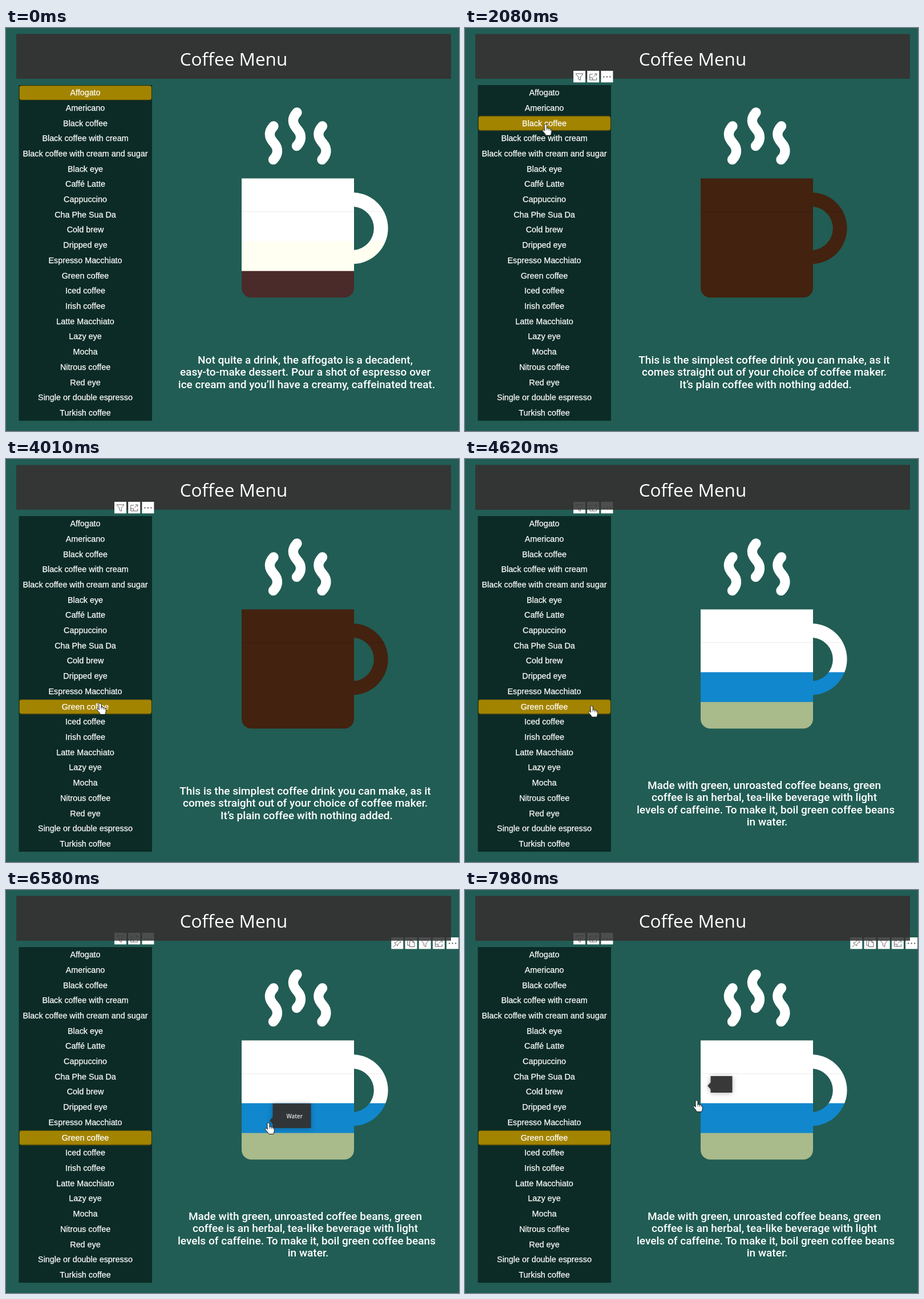
An HTML page that plays this animation: 794x706 px, repeating every 8000 ms.

```html
<!DOCTYPE html>
<html lang="en">
<head>
<meta charset="utf-8">
<title>Coffee Menu</title>
<style>
  html, body { margin: 0; width: 100%; height: 100%; overflow: hidden; background: #215d54; }
  svg { display: block; width: 794px; height: 706px; }
  text { fill: #fff; font-variant-ligatures: none; }
  .title { font: 400 31.5px "Open Sans", "Noto Sans", sans-serif; text-anchor: middle; }
  .menu text { font: 14.35px "Liberation Sans", Arial, sans-serif; text-anchor: middle; stroke: #fff; stroke-width: .25px; }
  .note text { font: 500 19.05px Roboto, sans-serif; text-anchor: middle; }
  .tip text { font: 600 9.8px "Open Sans", "Noto Sans", sans-serif; fill: #e4e4e4; }
  .tip { filter: drop-shadow(0 1px 4px rgba(0, 0, 0, .3)); }
  .icon { fill: none; stroke: #666; stroke-width: 1; }

  /* Everything switches hard unless a keyframe asks for easing. */
  .anim { animation: 8s step-end infinite; }
  #pick { animation-name: pick; }
  #affogato { animation-name: affogato; }
  #black { animation-name: black; }
  #green { animation-name: green; }
  #menuTools { animation-name: menu-tools; }
  #mugTools { animation-name: mug-tools; }
  #cover { animation-name: cover; }
  #tipCoffee { animation-name: tip-coffee; }
  #tipBeans { animation-name: tip-beans; }
  #tipWater { animation-name: tip-water; }
  #tipBlank { animation-name: tip-blank; }
  #hand { animation-name: hand; }

  @keyframes pick {
    0% { transform: translateY(0); }
    14.875% { transform: translateY(53.42px); }
    50.125%, 100% { transform: translateY(320.5px); }
  }
  @keyframes affogato { 0% { visibility: visible; } 17.25%, 100% { visibility: hidden; } }
  @keyframes black {
    0% { visibility: hidden; } 17.25% { visibility: visible; } 50.75%, 100% { visibility: hidden; }
  }
  @keyframes green { 0% { visibility: hidden; } 50.75%, 100% { visibility: visible; } }
  @keyframes menu-tools { 0% { visibility: hidden; } 4.25%, 100% { visibility: visible; } }
  @keyframes mug-tools {
    0% { visibility: hidden; } 28.5% { visibility: visible; }
    44% { visibility: hidden; } 58.5%, 100% { visibility: visible; }
  }
  @keyframes cover {
    0% { visibility: visible; } 17.25% { visibility: hidden; } 28% { visibility: visible; }
    49.5% { visibility: hidden; } 57.5%, 100% { visibility: visible; }
  }
  @keyframes tip-coffee {
    0% { visibility: hidden; transform: translate(425px, 388px); }
    34.25% { visibility: visible; transform: translate(425px, 388px); }
    40.625%, 100% { visibility: hidden; transform: translate(425px, 388px); }
  }
  @keyframes tip-beans {
    0% { visibility: hidden; transform: translate(422px, 445px); }
    67.125% { visibility: visible; transform: translate(422px, 445px); }
    73.5% { visibility: visible; transform: translate(422px, 445px); animation-timing-function: ease-in-out; }
    77%, 100% { visibility: hidden; transform: translate(461px, 406px); }
  }
  @keyframes tip-water {
    0% { visibility: hidden; transform: translate(462px, 404px); }
    77% { visibility: visible; transform: translate(462px, 404px); }
    82.875% { visibility: visible; transform: translate(462px, 404px); animation-timing-function: ease-in; }
    84%, 100% { visibility: hidden; transform: translate(463px, 374px); }
  }
  @keyframes tip-blank {
    0% { visibility: hidden; transform: translate(461px, 348px); }
    84% { visibility: visible; transform: translate(461px, 348px); }
    91.5% { visibility: visible; transform: translate(461px, 348px); animation-timing-function: ease-in-out; }
    95.125% { visibility: visible; transform: translate(454px, 296px); }
    98.4% { visibility: visible; transform: translate(454px, 296px); animation-timing-function: linear; }
    99.75%, 100% { visibility: visible; transform: translate(425px, 343px); }
  }
  @keyframes hand {
    0% { visibility: hidden; transform: translate(146px, 660px); }
    4.25% { visibility: visible; transform: translate(146px, 660px); animation-timing-function: ease-in; }
    8.25% { visibility: visible; transform: translate(114px, 390px); animation-timing-function: ease-out; }
    13.125% { visibility: visible; transform: translate(135px, 163px); }
    25.5% { visibility: visible; transform: translate(135px, 163px); animation-timing-function: ease-in-out; }
    30.75% { visibility: visible; transform: translate(474px, 410px); }
    40.125% { visibility: visible; transform: translate(474px, 410px); animation-timing-function: ease-in-out; }
    48.75% { visibility: visible; transform: translate(165px, 427px); }
    54.875% { visibility: visible; transform: translate(165px, 427px); animation-timing-function: ease-in-out; }
    64.25% { visibility: visible; transform: translate(454px, 450px); }
    73% { visibility: visible; transform: translate(454px, 450px); animation-timing-function: ease-in-out; }
    77% { visibility: visible; transform: translate(460px, 407px); }
    82.75% { visibility: visible; transform: translate(460px, 407px); animation-timing-function: ease-in-out; }
    84.625% { visibility: visible; transform: translate(461px, 355px); }
    91.125% { visibility: visible; transform: translate(461px, 355px); animation-timing-function: ease-in-out; }
    95.125% { visibility: visible; transform: translate(451px, 304px); }
    98.125% { visibility: visible; transform: translate(451px, 304px); animation-timing-function: ease-in-out; }
    99.75%, 100% { visibility: visible; transform: translate(406px, 368px); }
  }
</style>
</head>
<body>
<svg viewBox="0 0 794 706">
  <defs>
    <clipPath id="mug">
      <path d="M413 263.500H610V455a17 17 0 0 1-17 17.300H430a17 17 0 0 1-17-17.300Z"/>
      <path d="M609.5 288.200A62.6 62.6 0 0 1 609.5 413.300V389A38.1 38.1 0 0 0 609.5 313Z"/>
    </clipPath>
    <path id="steam" d="M469 172C458 184 462 193 470 202C478 211 477 222 468.500 230.500"/>
    <g id="funnel"><path d="M4 5H17L12.200 11V16.500L8.800 14.500V11Z"/></g>
    <g id="focus"><path d="M10 6H4.500V16H16.500V12M12.500 5H16.500V9M16.500 5L11 10.500M4.500 12H9.500V16"/></g>
    <g id="dots" fill="#666" stroke="none">
      <circle cx="5" cy="10.500" r="1.200"/><circle cx="10.500" cy="10.500" r="1.200"/><circle cx="16" cy="10.500" r="1.200"/>
    </g>
    <g id="pin"><path d="M12 3.500L17 8.500L14.500 9L11.500 12L11 15L5.500 9.500L8.500 9L11.500 6ZM8 12.500L3.500 17"/></g>
    <g id="copy"><path d="M8 16.500H16.500V9L13.500 6H8ZM13.500 6V9H16.500M8 14H4.500V4H10.500L12 6"/></g>
  </defs>

  <rect width="794" height="706" fill="#215d54"/>
  <rect x="18" y="10.500" width="762" height="78.300" fill="#333635"/>

  <g class="menu">
    <rect x="22.500" y="100" width="233.500" height="588" fill="#0c2b26"/>
    <rect id="pick" class="anim" x="23.300" y="100.800" width="232" height="25.400" rx="3.500" fill="#a38400" stroke="#2a2a14" stroke-width=".7"/>
    <g id="items"></g>
  </g>

  <g fill="none" stroke="#fff" stroke-width="17.400" stroke-linecap="round">
    <use href="#steam"/><use href="#steam" x="41" y="-24"/><use href="#steam" x="85.500"/>
  </g>
  <g id="scenes"></g>

  <g id="menuTools" class="anim"></g>
  <g id="mugTools" class="anim"></g>
  <rect id="cover" class="anim" x="18" y="10.500" width="762" height="78.300" fill="#333635" opacity=".88"/>
  <text class="title" x="399" y="66">Coffee Menu</text>

  <g id="tips"></g>

  <g id="hand" class="anim" stroke="#111" stroke-linejoin="round" stroke-linecap="round">
    <path fill="#fff" d="M-2 1.800Q0-1 2 1.800V8Q4 6.800 5.300 8.500Q7.300 7.800 8.200 9.700Q10.200 9.500 10.300 11.500V15Q10 18 8.700 20.500H.5Q-1.500 17-4.800 13.400Q-6.500 10.800-4.500 10.200Q-3.200 10.200-2 12Z"/>
    <path fill="none" stroke-width=".7" d="M2 8V11M5.300 8.700V11.500M8.200 10V12"/>
  </g>
</svg>
<script>
  const $ = id => document.getElementById(id);
  const text = (x, y, s) => `<text x="${x}" y="${y}">${s}</text>`;
  const band = (y, h, fill) => `<rect x="410" y="${y}" width="265" height="${h}" fill="${fill}"/>`;

  const drinks = ["Affogato", "Americano", "Black coffee", "Black coffee with cream",
    "Black coffee with cream and sugar", "Black eye", "Caffé Latte", "Cappuccino", "Cha Phe Sua Da",
    "Cold brew", "Dripped eye", "Espresso Macchiato", "Green coffee", "Iced coffee", "Irish coffee",
    "Latte Macchiato", "Lazy eye", "Mocha", "Nitrous coffee", "Red eye",
    "Single or double espresso", "Turkish coffee"];
  $("items").innerHTML = drinks.map((name, i) => text(139, Math.round(118.1 + i * 26.71), name)).join("");

  // Colours run from the top of the mug to the bottom.
  function scene(id, [top, line, middle, bottom], firstLine, lines) {
    const note = lines.map((s, i) =>
      text(524.5 + 2.5 * Math.max(0, i - 1), firstLine + i * 21.4, s)).join("");
    return `<g id="${id}" class="anim"><g clip-path="url(#mug)">` +
      band(260, 114, top) + band(321.3, 0.9, line) + band(373.5, 53, middle) + band(425.7, 50, bottom) +
      `</g><g class="note">${note}</g></g>`;
  }
  $("scenes").innerHTML =
    scene("affogato", ["#fff", "#e8eaea", "#fffff2", "#4b2a2a"], 588, [
      "Not quite a drink, the affogato is a decadent,",
      "easy-to-make dessert. Pour a shot of espresso over",
      "ice cream and you’ll have a creamy, caffeinated treat."]) +
    scene("black", ["#432210", "#391c0d", "#432210", "#432210"], 588, [
      "This is the simplest coffee drink you can make, as it",
      "comes straight out of your choice of coffee maker.",
      "It’s plain coffee with nothing added."]) +
    scene("green", ["#fff", "#e8eaea", "#1187cd", "#a9ba8b"], 578, [
      "Made with green, unroasted coffee beans, green",
      "coffee is an herbal, tea-like beverage with light",
      "levels of caffeine. To make it, boil green coffee beans",
      "in water."]);

  const tools = (x, y, names) => names.map((name, i) =>
    `<g class="icon" transform="translate(${x + i * 24.2} ${y})">` +
    `<rect width="21" height="20.3" fill="#fff" stroke="none"/><use href="#${name}"/></g>`).join("");
  $("menuTools").innerHTML = tools(190, 75, ["funnel", "focus", "dots"]);
  $("mugTools").innerHTML = tools(675.3, 83, ["pin", "copy", "funnel", "focus", "dots"]);

  // Each tooltip is placed by the point of its arrow.
  const tip = (id, width, label) => {
    const [y, h] = label ? [-30, 43] : [-17, 29];
    return `<g id="${id}" class="anim tip"><path fill="#333" opacity=".96" ` +
      `d="M0 0L5.5-6V${y}h${width}v${h}h${-width}V6Z"/>${text(29.5, -4, label)}</g>`;
  };
  $("tips").innerHTML = tip("tipCoffee", 68.5, "Coffee") + tip("tipBeans", 129.5, "Green Coffee Beans") +
    tip("tipWater", 67, "Water") + tip("tipBlank", 38, "");
</script>
</body>
</html>
```
